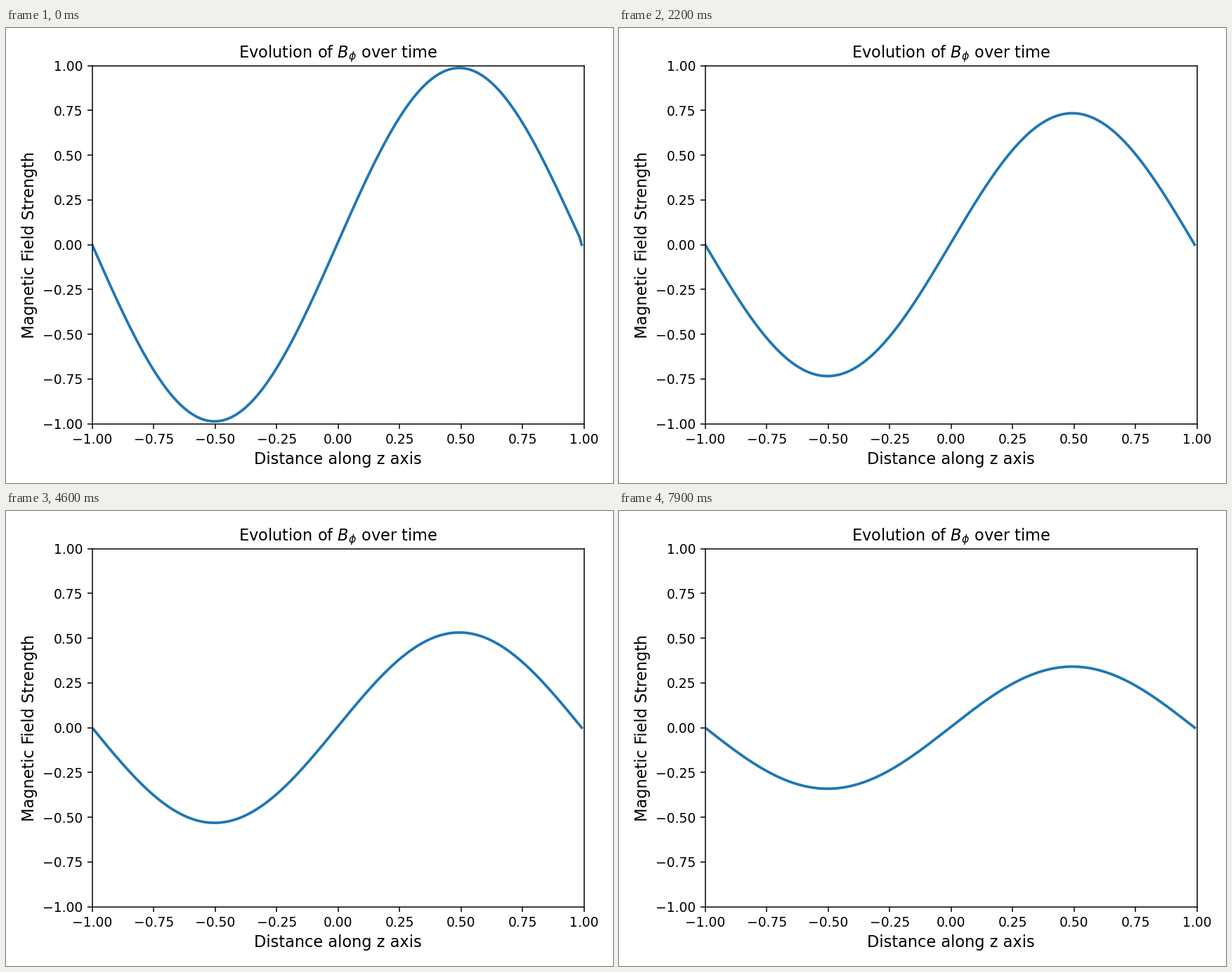
Write a matplotlib script that moves like this. It is 864 px wide and 648 px high and loops after 8000 ms.

```python
import numpy as np
import matplotlib.pyplot as plt
from matplotlib.animation import FuncAnimation

W, H, DPI = 864, 648, 135
FRAMES, INTERVAL = 80, 100
DECAY = 0.01345            # amplitude loss per step
LEFT, RIGHT, TOP, BOTTOM = 122.6, 822.9, 53.55, 563.6

plt.rcParams.update({"font.family": "DejaVu Sans", "font.size": 10})

x = -1 + 0.01 * np.arange(200)
span = x[-1] - x[0]
mode = -np.sin(2 * np.pi * (x - x[0]) / span)

# Short-lived edge layer left by the clamped right end
edge = 0.016 * np.exp((x - x[-2]) / 0.1)
edge[-1] = 0


def field(k):
    return mode * np.exp(-DECAY * (k + 1)) + edge * np.exp(-k / 2)


fig = plt.figure(figsize=(W / DPI, H / DPI), dpi=DPI, facecolor="white")
ax = fig.add_axes([LEFT / W, 1 - BOTTOM / H,
                   (RIGHT - LEFT) / W, (BOTTOM - TOP) / H])
ax.set_xlim(-1, 1)
ax.set_ylim(-1, 1)
ticks = np.linspace(-1, 1, 9)
ax.set_xticks(ticks)
ax.set_yticks(ticks)
ax.set_title(r"Evolution of $B_{\phi}$ over time", fontsize=12)
ax.set_xlabel("Distance along z axis", fontsize=12)
ax.set_ylabel("Magnetic Field Strength", fontsize=12)

line, = ax.plot(x, field(0), color="#1f77b4", lw=2)


def update(k):
    line.set_ydata(field(k))
    return line,


anim = FuncAnimation(fig, update, frames=FRAMES, interval=INTERVAL,
                     repeat=True, repeat_delay=0)
plt.show()
```
